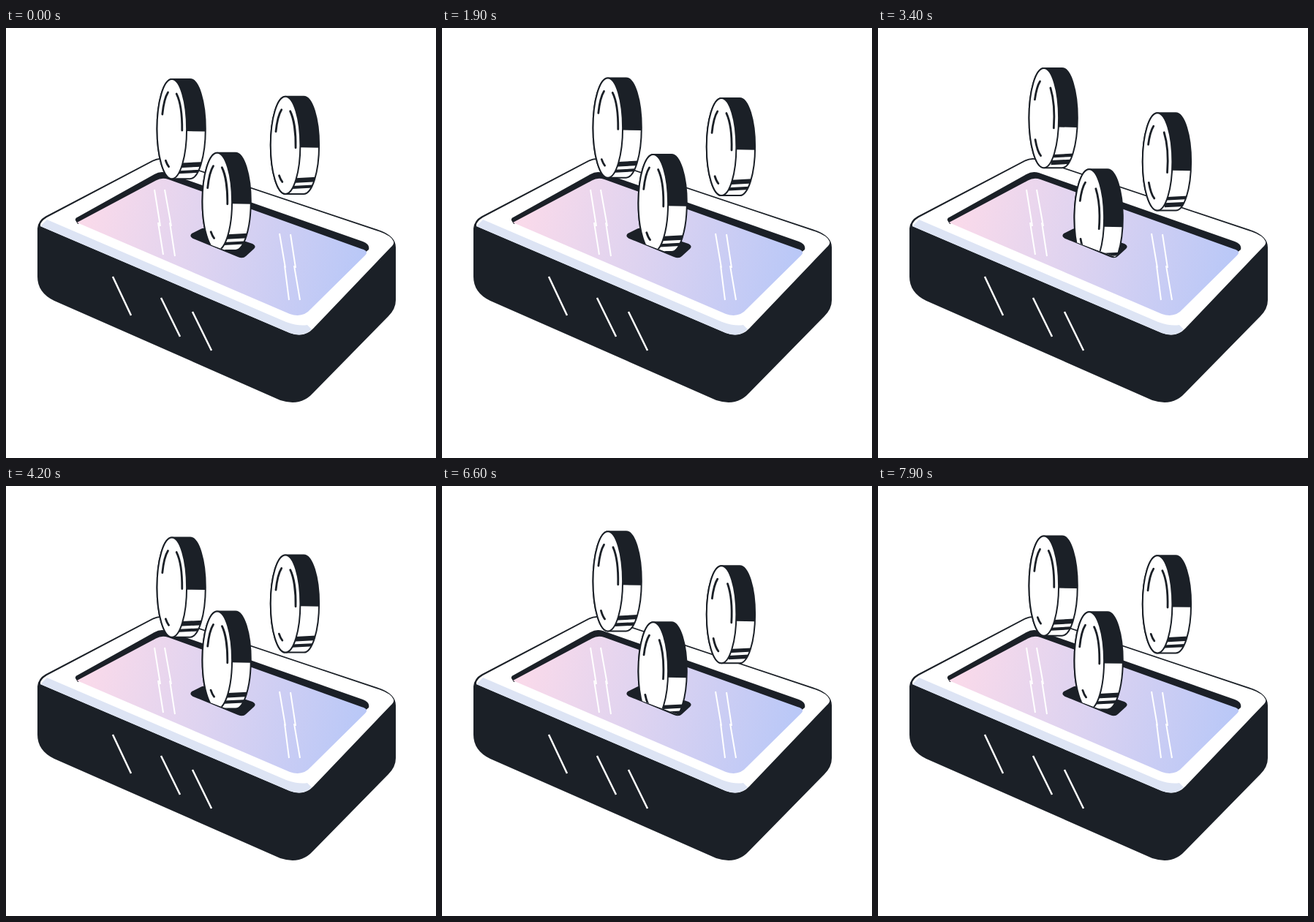
An HTML page for the animation above (8 s loop, 588 by 588 pixels).

```html
<!DOCTYPE html>
<html lang="en">
<head>
<meta charset="utf-8">
<title>Coins and box</title>
<style>
  html, body { margin: 0; width: 100%; height: 100%; overflow: hidden; background: #fff; }
  svg { display: block; width: 100vw; height: 100vh; }
  .ink { fill: #1b2027; }
  .line { fill: none; stroke: #1b2027; stroke-width: 2; stroke-linecap: round; }
  .glint { stroke-width: 2.8; }
  .shine { fill: none; stroke: #fff; stroke-width: 2; }
  .front { stroke-width: 2.5; }
</style>
</head>
<body>
<svg viewBox="0 0 588 588">
  <defs>
    <linearGradient id="glass" gradientUnits="userSpaceOnUse" x1="110" y1="245" x2="475" y2="345">
      <stop offset="0" stop-color="#fadaea"/>
      <stop offset=".45" stop-color="#ded3f0"/>
      <stop offset="1" stop-color="#bac8f7"/>
    </linearGradient>
    <clipPath id="slot">
      <path d="M200 100H400V298H341L324 313L253 286L200 266Z"/>
    </clipPath>
  </defs>

  <path class="ink" d="M43 274Q44 263 54 257.5L200 181Q210 175.5 222 180L512 277Q533 285 533 300V372Q533 384 523 394L420 499Q403 518 375 509L66 373Q43 362 43 340Z"/>
  <path fill="#fff" d="M47 269Q48 264 56 259L201 182.5Q211 177.5 221 181.5L511 278.5Q527 284 530 292Q531 296 526 300L420 411Q408 424 388 417L47 271Z"/>
  <path fill="#dde4f4" d="M47 271L56 262L383 402Q400 408 412 406L418 412Q406 424 388 417Z"/>

  <path class="ink" d="M95 263Q94 260 99 258L203 200Q211 195 220 198L488 292Q498 296 496 303L490 308L215 212L98 268Z"/>
  <path fill="url(#glass)" d="M97 266L205 208.5Q213 204 222 207L486 302Q497 305 491 311L417 384Q406 397 388 391Z"/>
  <path class="shine" d="M203 221L211 271M208 266L215 310M217 221L226 271M224 266L231 312M374 281L382 328M381 325L387 372M389 282L396 328M394 325L402 372"/>
  <path class="shine front" d="M146 340L171 393M212 369L238 422M255 388L281 441"/>
  <path class="ink" d="M254 281L266 275Q270 273 275 274.5L337 295Q343 298 339 302L328 312Q324 316 317 313L256 288Q250 285 254 281Z"/>

  <g id="coins"></g>
</svg>
<script>
const LOOP = 8000, FRAME = 100;
const layer = document.getElementById('coins');

function add(parent, tag, attrs) {
  const node = document.createElementNS('http://www.w3.org/2000/svg', tag);
  for (const key in attrs) node.setAttribute(key, attrs[key]);
  parent.appendChild(node);
  return node;
}

function makeCoin(id, x, h, holder) {
  const r = h / 2, g = add(holder, 'g', {});
  const hull = `M20.3 0H45.3A21 ${r} 0 0 1 45.3 ${h}H20.3A20.3 ${r} 0 0 1 20.3 0Z`;
  add(add(g, 'clipPath', { id }), 'path', { d: hull });
  add(g, 'path', { d: hull, fill: '#fff' });
  const rim = add(g, 'g', { 'clip-path': `url(#${id})` });
  const shade = add(rim, 'path', { class: 'ink' });
  const bands = add(rim, 'path', { class: 'ink' });
  add(g, 'path', { class: 'line', d: hull });
  add(g, 'ellipse', { class: 'line', cx: 20.3, cy: r, rx: 20.3, ry: r, style: 'fill:#fff' });
  const glints = add(g, 'path', { class: 'line glint' });

  // Arc on the inner ring between two heights; side is -1 (left) or 1 (right).
  function arc(side, from, to) {
    const ry = r - 14;
    const point = y => {
      const k = (y - r) / ry;
      return `${20.3 + side * 14 * Math.sqrt(Math.max(0, 1 - k * k))} ${y}`;
    };
    return `M${point(from)}A14 ${ry} 0 0 ${side > 0 ? 1 : 0} ${point(to)}`;
  }
  const band = (y, size) => `M30 ${y + 1}L70 ${y - 1}V${y - 1 + size}L30 ${y + 1 + size}Z`;

  return (y, turn) => {
    const edge = h * .522 + 11 * turn;
    g.setAttribute('transform', `translate(${x} ${y})`);
    shade.setAttribute('d', `M0 0H70V${edge + .5}L40 ${edge}H0Z`);
    bands.setAttribute('d', band(h - 22.5 + 4 * turn, 6.5 - 2.5 * turn) + band(h - 12 + turn, 4 + 2.5 * turn));
    glints.setAttribute('d',
      arc(-1, 18, 48 - 6 * turn) +
      arc(1, 20 + 8 * turn, 70 + 14 * turn) +
      arc(-1, h - 25 - 16 * turn, h - 16.5));
  };
}

const left = makeCoin('rimA', 206.5, 136.2, layer);
const right = makeCoin('rimB', 361.8, 133.2, layer);
const middle = makeCoin('rimC', 268.5, 133.2, add(layer, 'g', { 'clip-path': 'url(#slot)' }));

// Turning points of the sinking coins, alternately high and low.
const turns = [-880, 50, 1170, 2070, 3130, 4080, 5130, 6020, 7100, 8050];

function sink(t) {
  const i = turns.findIndex(v => v > t) - 1;
  const wave = (1 - Math.cos(Math.PI * (t - turns[i]) / (turns[i + 1] - turns[i]))) / 2;
  return i % 2 ? wave : 1 - wave;
}

function draw(now) {
  const t = Math.floor((now % LOOP) / FRAME) * FRAME;
  const rise = (1 - Math.cos(2 * Math.PI * (t - 130) / 2000)) / 2;
  const turn = (rise * rise * (3 - 2 * rise)) ** 2;
  const depth = sink(t);
  left(70.8 - 19 * rise, turn);
  right(93.5 + 28 * depth, depth);
  middle(170.5 + 28 * depth, depth);
}

function tick() {
  draw(performance.now());
  requestAnimationFrame(tick);
}
tick();
</script>
</body>
</html>
```
